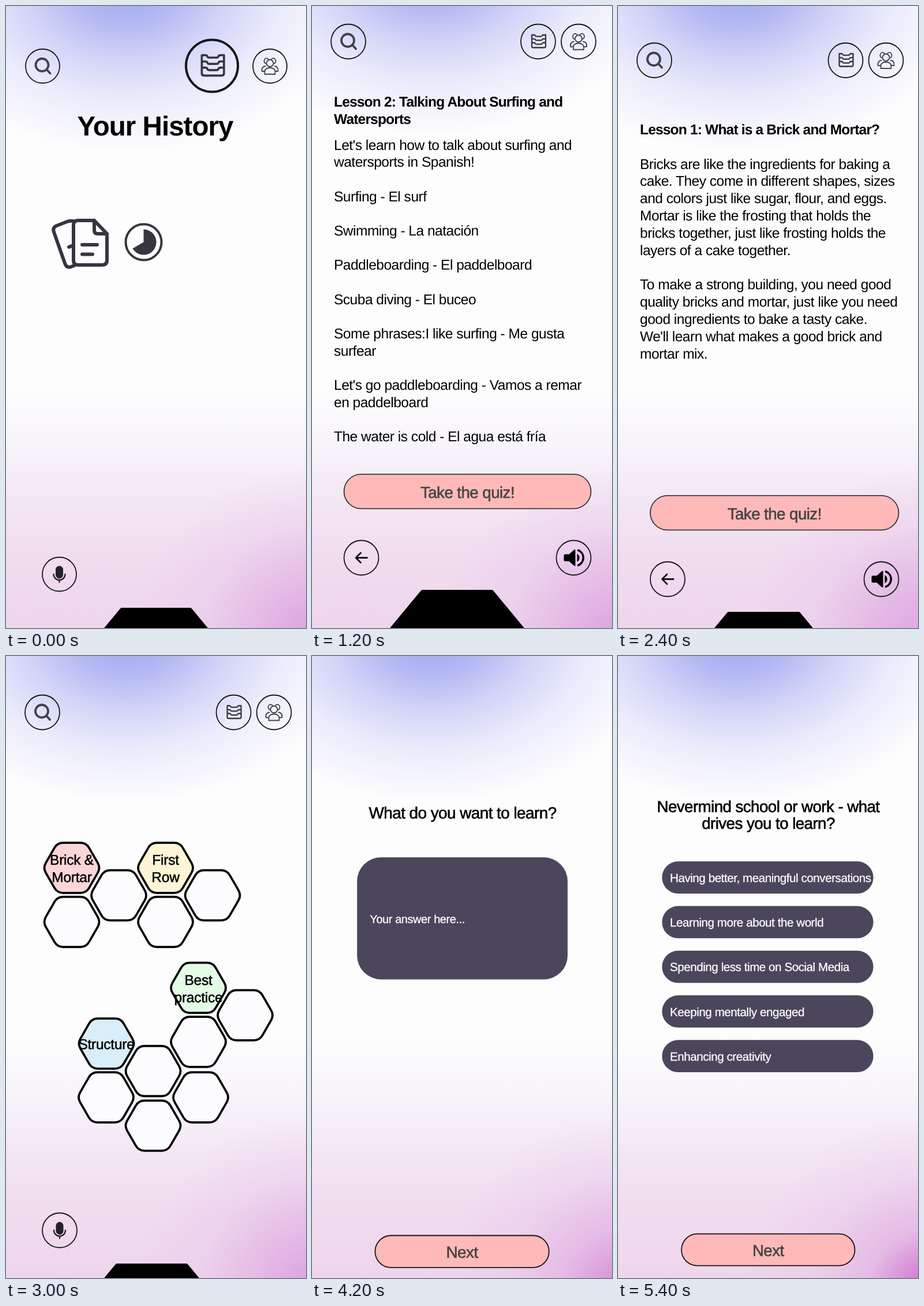
An HTML page that plays this animation: 520x1076 px, repeating every 6 s.

```html
<!DOCTYPE html>
<html lang="en">
<head>
<meta charset="utf-8">
<title>Learning app screens</title>
<style>
html, body { margin: 0; width: 100%; height: 100%; overflow: hidden; background: #fdfdfd; }
svg {
  position: absolute; left: 0; top: 0; width: 520px; height: 1076px;
  font-family: "Liberation Sans", Arial, sans-serif;
  text-rendering: geometricPrecision;
  visibility: hidden;
  background:
    radial-gradient(310px 300px at 540px 1095px, var(--glow), #e0b0e3b8 34%, #e8c6ea60 66%, #ecd0ec00),
    radial-gradient(400px 290px at 208px calc(-35px + var(--rise)), #a0a6ef, #b3b7f2 22%, #d3d5f8 45%, #ecedfc 70%, #fdfdfd00),
    linear-gradient(#fdfdfd 61%, #f8f5fb 70%, #f3e6f4 80%, #f0dbef 90%, #eed6ec);
  animation: show 6s step-end infinite;
  animation-delay: calc(var(--i) * 600ms - 6s);
}
@keyframes show { 0% { visibility: visible; } 10%, 100% { visibility: hidden; } }
text { letter-spacing: -.02em; white-space: pre; }
.body { font-size: 24.5px; }
.bold { font-size: 24.5px; font-weight: 700; letter-spacing: -.033em; }
.title { font-size: 47.5px; font-weight: 700; }
.head, .button { font-size: 27.7px; stroke: #000; stroke-width: .6px; }
.button { fill: #444; stroke: #444; }
.hex { font-size: 24.5px; letter-spacing: -.01em; stroke: #000; stroke-width: .5px; }
.chip { font-size: 20.8px; fill: #4a4458; stroke: #4a4458; stroke-width: .4px; }
.pill { font-size: 20.5px; fill: #fff; stroke: #fff; stroke-width: .3px; }
.answer { font-size: 19.8px; fill: #fff; stroke: #fff; stroke-width: .3px; }
.line { fill: none; stroke: #363640; stroke-linecap: round; stroke-linejoin: round; }
</style>
</head>
<body>
<script>
const text = (x, y, s, cls, anchor = 'start') =>
  `<text x="${x}" y="${y}" class="${cls}" text-anchor="${anchor}">${s.replace('&', '&amp;')}</text>`;
const mid = (x, y, s, cls) => text(x, y, s, cls, 'middle');
const box = (x, y, w, h, r, fill, stroke = 'none', sw = 1.6) =>
  `<rect x="${x}" y="${y}" width="${w}" height="${h}" rx="${r}" fill="${fill}" stroke="${stroke}" stroke-width="${sw}"/>`;
const line = (d, w, color = '#363640') => `<path class="line" d="${d}" style="stroke:${color};stroke-width:${w}"/>`;
const at = (x, y, inner, k = 1) => `<g transform="translate(${x} ${y}) scale(${k})">${inner}</g>`;
const ring = (x, y, inner, r = 30, sw = 1.8, k = 1) =>
  `<circle cx="${x}" cy="${y}" r="${r}" fill="none" stroke="#17171b" stroke-width="${sw}"/>` + at(x, y, inner, k);

const shelf = y => `M-11 ${y}h4q1.5 0 2 1.3t2 1.3h8q1.5 0 2-1.3t2-1.3h4`;
const icons = {
  search: line('M10-2A11 11 0 1 1-12-2A11 11 0 1 1 10-2M7 6L13 12.5', 3.8, '#41414a'),
  shelves: line(`M-11-11.500V8q0 2.500 2.500 2.500H10.500q2.500 0 2.500-2.500V-11.500M-11-11.500h4q1.500 0 2 1.300t2 1.300h8q1.500 0 2-1.300t2-1.300h4` +
    `M-11-4.500h4q1.500 0 2 1.300t2 1.300h8q1.500 0 2-1.300t2-1.300h4M-11 2h4q1.500 0 2 1.300t2 1.300h8q1.500 0 2-1.300t2-1.300h4`, 2.3),
  people: line('M6-5A6 6 0 1 1-6-5A6 6 0 1 1 6-5M-9 14V10Q-9 3 0 3T9 10V14Z' +
    'M-6-4C-12-5-11-14-5-13.500Q-3-13-2-11H2Q3-13 5-13.500C11-14 12-5 6-4' +
    'M-9 9H-14Q-15 1-8 0M9 9H14Q15 1 8 0', 1.8, '#44444c'),
  mic: '<rect x="-6.5" y="-14.5" width="13" height="22" rx="6.5" fill="#222228"/>' +
    line('M-10 0A10 10 0 0 0 10 0M0 10V14', 2.3, '#222228'),
  back: line('M10 0H-9M-1-8.500L-9.500 0L-1 8.500', 2.8, '#111'),
  sound: '<path d="M-15-6H-8L1-14Q3-15 3-13V13Q3 15 1 14L-8 6H-15Q-17 6-17 4V-4Q-17-6-15-6ZM6-7A8 8 0 0 1 6 7Z"/>' +
    line('M8-13A14 14 0 0 1 8 13', 3.6, '#000'),
  pages: line('M116 372Q112 371 106 373L88 380Q80 383 83 391L102 445Q105 454 113 451L118 449M109 417L114 415', 6) +
    '<path class="line" style="fill:#fdfdfd;stroke-width:6" d="M153 371H125Q117 371 117 379V440Q117 448 125 448H166Q175 448 175 440V394L153 371V388Q153 394 159 394H175"/>' +
    line('M132 413H158M132 429.5H150', 6),
  pie: '<circle r="31" class="line" stroke-width="4"/><path fill="#363640" d="M0 0V-22A22 22 0 1 1-19 11Z"/>'
};
icons.shelves = line(`M-11-11.5V8q0 2.5 2.5 2.5H10.5q2.500 0 2.500-2.500V-11.5${[-11.5, -4.7, 2].map(shelf).join('')}`, 2.3);

const header = (y, x1, x2) =>
  ring(63, y, icons.search) + ring(x1, y, icons.shelves) + ring(x2, y, icons.people);

const stand = (x0, x1, y) => {
  const d = (1076 - y) * .83;
  return `<path d="M${x0 + 2} 1080L${x0 + d + 2} ${y + 4}H${x1 - d - 2}L${x1 - 2} 1080Z" stroke="#000" stroke-width="8" stroke-linejoin="round"/>`;
};

const history = () =>
  ring(63.5, 104, icons.search, 29.5) + ring(357, 103.5, icons.shelves, 45, 4, 1.6) +
  ring(457.5, 104, icons.people, 29.5) + mid(258.5, 224, 'Your History', 'title') +
  icons.pages + at(238.5, 408.5, icons.pie) + ring(92.5, 983, icons.mic, 29.5);

const paragraph = (y, step, rows) =>
  rows.map((s, i) => s && text(38, y + i * step, s, 'body')).join('');

const lessonEnd = (x, w, y, yc) =>
  box(x, y, w, 59.5, 29.7, '#ffb9b9', '#222') +
  mid(x + w / 2, y + 40.5, 'Take the quiz!', 'button') +
  ring(x + 30, yc, icons.back) + ring(x + w - 30, yc, icons.sound);

const surfing = () =>
  header(61.5, 392, 462) +
  text(38, 174, 'Lesson 2: Talking About Surfing and', 'bold') + text(38, 204, 'Watersports', 'bold') +
  paragraph(248.5, 29.67, ["Let's learn how to talk about surfing and", 'watersports in Spanish!', '',
    'Surfing - El surf', '', 'Swimming - La natación', '', 'Paddleboarding - El paddelboard', '',
    'Scuba diving - El buceo', '', 'Some phrases:I like surfing - Me gusta', 'surfear', '',
    "Let's go paddleboarding - Vamos a remar", 'en paddelboard', '',
    'The water is cold - El agua está fría']) +
  lessonEnd(55.5, 428, 810, 954.5) + stand(135, 368, 1010);

const bricks = () =>
  header(94, 394.5, 464.5) +
  text(38, 222, 'Lesson 1: What is a Brick and Mortar?', 'bold') +
  paragraph(281.5, 29.85, ['Bricks are like the ingredients for baking a',
    'cake. They come in different shapes, sizes', 'and colors just like sugar, flour, and eggs.',
    'Mortar is like the frosting that holds the', 'bricks together, just like frosting holds the',
    'layers of a cake together.', '', 'To make a strong building, you need good',
    'quality bricks and mortar, just like you need', 'good ingredients to bake a tasty cake.',
    "We'll learn what makes a good brick and", 'mortar mix.']) +
  lessonEnd(56, 430.5, 847, 991.5) + stand(167, 338, 1048);

// Flat-topped hexagon with softened corners
const hexPath = (() => {
  const R = 50, r = 10, n = i => [R * Math.cos(i * Math.PI / 3), R * Math.sin(i * Math.PI / 3)];
  const toward = (a, b) => a.map((v, k) => v + (b[k] - v) * r / R);
  let d = '';
  for (let i = 0; i < 6; i++) {
    const c = n(i);
    d += `${i ? 'L' : 'M'}${toward(c, n(i - 1))}Q${c} ${toward(c, n(i + 1))}`;
  }
  return d + 'Z';
})();

const cells = [
  [114, 366.5, '#fad6d8', 'Brick &', 'Mortar'], [195.5, 414], [276.5, 366.5, '#fdf5d6', 'First', 'Row'],
  [358, 414], [114, 460], [276.5, 460], [333.5, 574, '#e4fbe6', 'Best', 'practice'], [414.5, 621.5],
  [333.5, 667.5], [174, 670.5, '#daeef9', 'Structure'], [255, 718], [337.5, 763.5], [173.5, 763.5], [255, 812.5]
];
const cell = ([x, y, fill = '#fcfbfe', a, b]) =>
  at(x, y, `<path d="${hexPath}" fill="${fill}" stroke="#000" stroke-width="3.8"/>`) +
  (b ? mid(x, y - 5.5, a, 'hex') + mid(x, y + 24.5, b, 'hex') : a ? mid(x, y + 9.5, a, 'hex') : '');
const map = () =>
  header(97.5, 394.5, 464.5) + cells.map(cell).join('') + ring(93, 993.5, icons.mic);

const next = (x, y, w) =>
  box(x, y, w, 55, 27.5, '#ffb9b9', '#151515', 1.8) + mid(x + w / 2, y + 38, 'Next', 'button');

const question = () =>
  mid(262.5, 283, 'What do you want to learn?', 'head') +
  box(81, 349.5, 362, 209.5, 41, '#4c465c') +
  text(103, 462.5, 'Your answer here...', 'answer') + next(112, 998.5, 299);

const hobbies = [
  ['Climbing', 136.5, 'Swimming', 151.5], ['Baking', 120.5, 'Mixology', 140],
  ['Carpentry', 146, 'Painting', 130], ['Weightlifting', 167, 'Language', 146],
  ['Hiking', 114, 'Cycling', 125], ['Photography', 173, 'Other', 107]
];
const chip = (x, y, w, s) =>
  box(x, y, w, 44.5, 22.2, 'none', '#4a4458', 1.5) +
  line(`M${x + 13.5} ${y + 22.3}h17.5m-8.75-8.75v17.5`, 2.2, '#4a4458') +
  text(x + 45.5, y + 30.5, s, 'chip');
const passions = () =>
  mid(262, 280, 'What are you passionate about?', 'head') +
  hobbies.map(([a, wa, b, wb], i) => {
    const y = 326.5 + i * 58.75;
    return chip(65, y, wa, a) + chip(79 + wa, y, wb, b);
  }).join('') + next(110.5, 1001.5, 301);

const drives = () =>
  mid(260.5, 269.5, 'Nevermind school or work - what', 'head') +
  mid(260.5, 299, 'drives you to learn?', 'head') +
  ['Having better, meaningful conversations', 'Learning more about the world',
    'Spending less time on Social Media', 'Keeping mentally engaged', 'Enhancing creativity']
    .map((s, i) => {
      const y = 355.3 + i * 77.25;
      return box(76.3, y, 366.3, 55.7, 27.8, '#4c465c') + text(90, y + 35.5, s, 'pill');
    }).join('') + next(110, 999.7, 300.5);

// [content, corner glow, shift of the top gradient]
const slides = [
  [history() + stand(170, 350, 1041), '#dc9fe0'],
  [at(0, -4, history()) + stand(170, 350, 1041), '#dc9fe0'],
  [surfing(), '#dc9fe0', -28],
  [at(0, -8, map()) + stand(170, 335, 1051), '#dc9fe0'],
  [bricks(), '#dea4e2'],
  [map() + stand(170, 335, 1051), '#dc9fe0'],
  [question(), '#d78ad6'],
  [at(-3.5, -4, question(), 1.008), '#d78ad6'],
  [passions(), '#d584d4'],
  [drives(), '#d06bcc']
];
document.body.innerHTML = slides.map(([inner, glow, rise = 0], i) =>
  `<svg viewBox="0 0 520 1076" style="--i:${i};--glow:${glow};--rise:${rise}px">${inner}</svg>`).join('');
</script>
</body>
</html>
```
